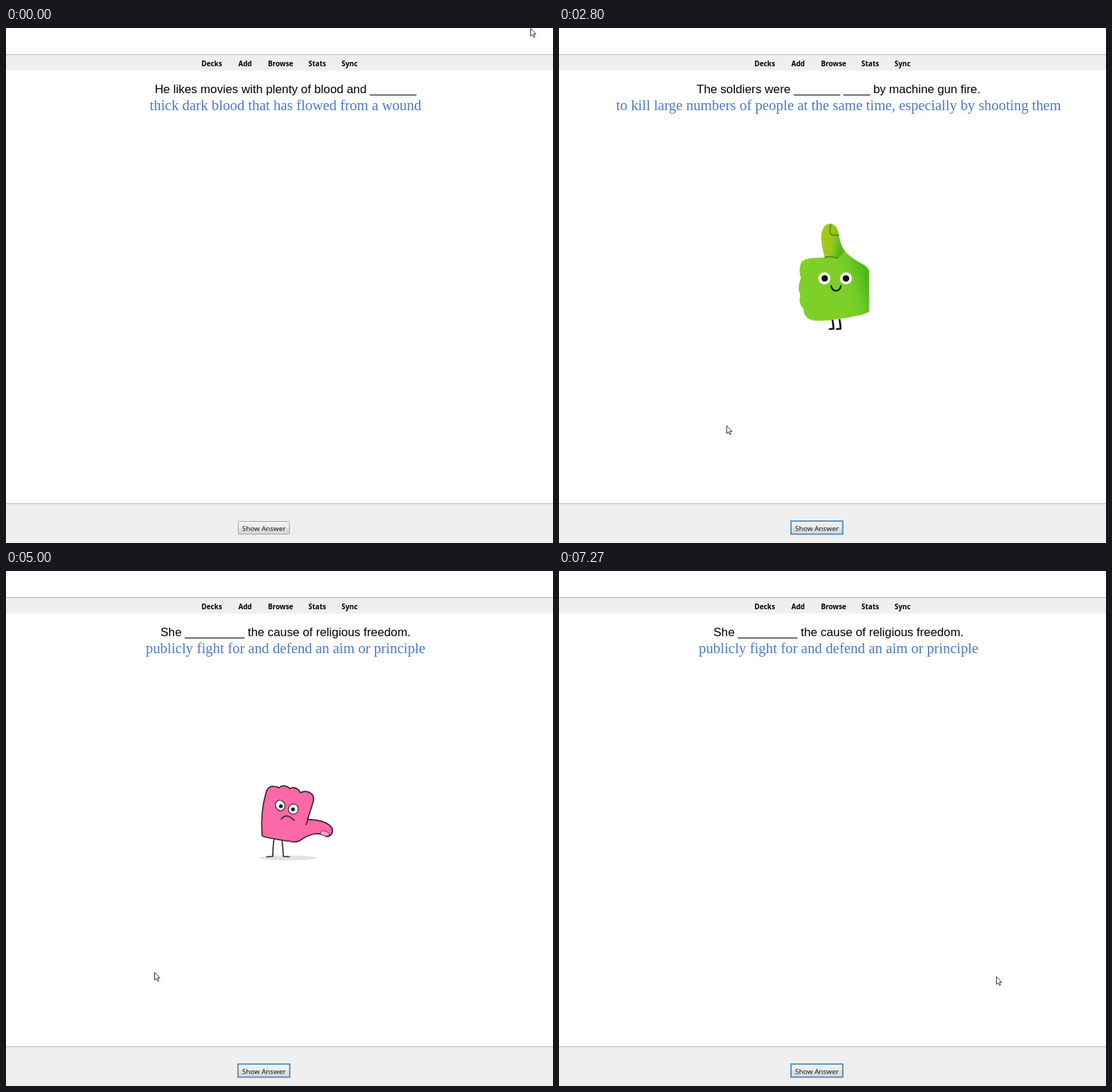
Recreate the animation shown at these times as an HTML page. Size 771 px wide and 727 px high, loop 7.33 s.

```html
<!DOCTYPE html>
<html lang="en">
<head>
<meta charset="utf-8">
<title>Flashcard review</title>
<style>
  html, body { margin: 0; width: 100%; height: 100%; overflow: hidden; background: #fff; }
  svg { display: block; }
  text { text-anchor: middle; white-space: pre; }
  .nav { font: 700 9.8px "Open Sans", sans-serif; }
  .ui { font: 9.8px "Open Sans", sans-serif; }
  .ask { font: 16.8px "Liberation Sans", sans-serif; }
  .hint { font: 20.4px "Liberation Serif", serif; fill: #4a7bc2; }
  .reply { font: 19.6px "Liberation Sans", sans-serif; fill: #980f76; }
  .line { fill: none; stroke-linecap: round; stroke-linejoin: round; }
  .ink { stroke: #35262c; stroke-width: 1.7; }
</style>
</head>
<body>
<svg width="771" height="727" viewBox="0 0 771 727">
  <defs>
    <linearGradient id="face" x2="0" y2="1">
      <stop offset="0" stop-color="#f2f2f2"/><stop offset=".5" stop-color="#ebebeb"/>
      <stop offset=".5" stop-color="#e0e0e0"/><stop offset="1" stop-color="#d6d6d6"/>
    </linearGradient>
    <linearGradient id="leaf" gradientUnits="userSpaceOnUse" x1="401" y1="374" x2="437" y2="364">
      <stop offset="0" stop-color="#7ed028"/><stop offset=".5" stop-color="#70cb25"/>
      <stop offset="1" stop-color="#4cb91b"/>
    </linearGradient>
    <linearGradient id="tip" gradientUnits="userSpaceOnUse" x1="371" y1="298" x2="399" y2="304">
      <stop offset="0" stop-color="#a4c81b"/><stop offset=".5" stop-color="#98c81d"/>
      <stop offset=".75" stop-color="#74c121"/><stop offset="1" stop-color="#4fb31c"/>
    </linearGradient>
  </defs>

  <rect width="771" height="727" fill="#fff"/>
  <path d="M0 37h771v23H0zM0 671h771v56H0z" fill="#efefef"/>
  <path d="M0 37.5h771M0 671.5h771" stroke="#b9b9b9"/>
  <g id="nav" class="nav"></g>

  <g id="card">
    <text id="ask" class="ask" x="394" y="92"/>
    <text id="hint" class="hint" x="394" y="116"/>
    <g id="back">
      <path d="M0 130.5h771" stroke="#a3a3a3"/>
      <text id="reply" class="reply" x="394" y="157.5"/>
    </g>
  </g>

  <g id="plain"></g>
  <g id="focused"></g>
  <g id="grades"></g>

  <g id="green">
    <path id="greenLegs" class="line" stroke="#111" stroke-width="2.6"/>
    <g id="greenBody">
      <path fill="url(#leaf)" d="M374 323L393 311L399 309Q407 321 424 330Q436 336 437 342V399Q434 403 406 408Q380 413 360 412Q345 410 344.500 395Q337 389 340 375Q335 367 341 352Q337 339 342 329Q347 323 374 323Z"/>
      <path fill="url(#tip)" d="M375 324Q370 309 369.500 293Q371 276 382 275Q392 276 394 289Q396 304 403 315L392 325Z"/>
      <path class="line" stroke="#45961b" stroke-width="1.800" d="M383 277Q380 290 385 291Q389 292 394 291M375 322.500Q384 321 393 323.500"/>
      <g fill="#fff"><circle cx="374" cy="352.500" r="8.500"/><circle cx="404.500" cy="352.500" r="8.500"/></g>
      <g fill="#111"><circle cx="374.500" cy="352.500" r="4.600"/><circle cx="404.500" cy="352.500" r="4.600"/></g>
      <path class="line" stroke="#111" stroke-width="2.200" d="M383.500 363Q385 370 390.500 370Q397 369 397 363"/>
    </g>
  </g>

  <g id="pink">
    <ellipse id="shade" cx="398" fill="#e2e2e2" rx="41"/>
    <path id="pinkLegs" class="line ink"/>
    <g id="pinkBody">
      <path class="ink" fill="#ff68a6" stroke-linejoin="round" d="M361 373C359 350 362 328 367 311Q371 303 377 304Q382 304 385 306Q391 300 400 307Q410 303 415 313Q423 309 430 314Q435 318 433 326L425 351C437 350 455 354 460 364Q461 374 452 375Q444 370 436 371Q428 372 418 378Q410 384 403 382Q385 380 363 375Q361 374 361 373Z"/>
      <path class="line ink" d="M426 350L423 358"/>
      <path fill="#ff9dc5" stroke="#7d3a58" d="M443 371Q444 366 449 367Q455 368 456 373Q450 376 443 371Z"/>
      <g fill="#fff" stroke="#35262c" stroke-width="1.200">
        <ellipse cx="386.500" cy="331" rx="6.600" ry="7.600" transform="rotate(-20 386.500 331)"/>
        <ellipse cx="405" cy="336" rx="7" ry="7.200"/>
      </g>
      <g fill="#222"><circle cx="387.500" cy="332" r="2.700"/><circle cx="404.500" cy="336.500" r="2.700"/></g>
      <path id="frown" class="line ink" d="M388 350Q396 341 406 352"/>
      <circle id="gasp" cx="390" cy="351" r="4.200" fill="#222"/>
    </g>
  </g>

  <path id="cursor" d="M.5.5V11.500L3 9.200L4.700 13L6.400 12.200L4.800 8.500H8Z" fill="#fff" stroke="#222" stroke-width=".9"/>
</svg>

<script>
const LOOP = 7330, STEP = 1000 / 15;
const $ = id => document.getElementById(id);

const cards = [
  ["He likes movies with plenty of blood and _______",
   "thick dark blood that has flowed from a wound", "gore"],
  ["The soldiers were _______ ____ by machine gun fire.",
   "to kill large numbers of people at the same time, especially by shooting them", "mown down"],
  ["She _________ the cause of religious freedom.",
   "publicly fight for and defend an aim or principle", ""]
];

const turns = [1270, 2400, 3330, 4530];      // start of each fade
const barTurns = [1270, 2330, 3330, 4470];   // bottom bar switches
const fade = [[-67, 1], [0, .65], [70, .1], [130, .35], [200, .8], [260, 1]];

// rows: time, x, y
const pointer = [
  [0, 739, 0], [270, 244, 565], [470, 244, 565], [1130, 236, 561],
  [4070, 236, 561], [4130, 230, 563], [4400, 209, 566], [6130, 209, 566],
  [6470, 628, 580], [6730, 628, 580], [6930, 616, 571], [7200, 616, 571], [7270, 616, 572]
];
// rows: time, turn of the fist (0 sideways, 1 down)
const swing = [
  [4330, 0], [4530, -.06], [4730, .04], [5000, 0], [5200, -.12],
  [5470, 1.08], [5600, .95], [5730, 1.04], [5870, 1]
];

const mix = (a, b, p) => a + (b - a) * p;
const passed = (list, t) => list.filter(s => t >= s).length;
const show = (id, on) => { $(id).style.display = on ? "" : "none"; };

function track(rows, t, col = 1) {
  const i = rows.findIndex(r => r[0] > t);
  if (i < 0) return rows[rows.length - 1][col];
  if (i === 0) return rows[0][col];
  const a = rows[i - 1], b = rows[i];
  return mix(a[col], b[col], (t - a[0]) / (b[0] - a[0]));
}

const label = (cx, y, s, color = "#111") =>
  `<text class="ui" x="${cx}" y="${y}" fill="${color}">${s}</text>`;

function button(x, y, w, s, color, focus) {
  const frame = focus
    ? `<rect x="${x}" y="${y}" width="${w + 1}" height="18.500" fill="url(#face)" stroke="#3f8ac4" stroke-width="1.700"/>`
    : `<rect x="${x + .5}" y="${y + .5}" width="${w}" height="18" rx="1" fill="url(#face)" stroke="#a5a5a5"/>`;
  return frame + label(x + w / 2 + .5, y + 13.7, s, color);
}

$("nav").innerHTML = [["Decks", 290], ["Add", 337], ["Browse", 387], ["Stats", 438.7], ["Sync", 484.3]]
  .map(([s, x]) => `<text x="${x}" y="53.500">${s}</text>`).join("");
$("plain").innerHTML = button(327, 696, 72, "Show Answer");
$("focused").innerHTML = button(327, 696, 72, "Show Answer", "#111", true);
$("grades").innerHTML =
  label(301, 689, "&lt;1m") + label(364, 689, "&lt;10m") + label(426, 689, "4d") +
  button(276, 697, 50, "Again", "#dd2222") +
  button(338, 697, 51, "Good", "#3f7a12", true) +
  button(401, 697, 50, "Easy", "#2424c0");

function drawCard(t) {
  const side = passed(turns.map(s => s + 130), t);
  const [ask, hint, reply] = cards[side >> 1];
  $("ask").textContent = ask;
  $("hint").textContent = hint;
  $("reply").textContent = reply;
  show("back", side % 2);
  $("card").setAttribute("opacity", Math.min(...turns.map(s => track(fade, t - s))));

  const bar = passed(barTurns, t);
  show("plain", bar === 0);
  show("focused", bar > 0 && bar % 2 === 0);
  show("grades", bar % 2);
}

function drawGreen(t) {
  const on = t >= 2130 && t < 3670;
  show("green", on);
  if (!on) return;
  const drop = 1.6 + 1.6 * Math.cos((t - 2400) / 580 * 2 * Math.PI);
  $("greenBody").setAttribute("transform", `translate(0 ${drop})`);
  const leg = x => `M${x} ${411 + drop}Q${x + 1} 418 ${x + 1.5} 424.500L${x - 4} 425`;
  $("greenLegs").setAttribute("d", leg(385.5) + leg(395.5));
}

function drawPink(t) {
  const on = t >= 4330 && t < 5930;
  show("pink", on);
  if (!on) return;
  const p = track(swing, t);
  const x = mix(360, 376, p), y = mix(373, 318.5, p);
  $("pinkBody").setAttribute("transform",
    `translate(${x} ${y}) rotate(${58 * p}) scale(${mix(1, .96, p)}) translate(-360 -373)`);
  // each leg: hip and bend for both poses, then ankle and toe
  const leg = (hx, hy, hx2, hy2, bx, by, bx2, by2, ankle, toe) =>
    `M${mix(hx, hx2, p)} ${mix(hy, hy2, p)}Q${mix(bx, bx2, p)} ${mix(by, by2, p)} ${ankle} 403L${toe} 403.500`;
  $("pinkLegs").setAttribute("d",
    leg(378, 376, 380, 335, 376, 390, 356, 360, 376, 367.5) +
    leg(389, 378, 386, 350, 390, 391, 375, 368, 391, 399.5));
  $("shade").setAttribute("cy", mix(405, 406.5, p));
  $("shade").setAttribute("ry", mix(3.5, 6, p));
  show("frown", p < .5);
  show("gasp", p >= .5);
}

const start = performance.now();
function draw(now) {
  const ms = Math.max(0, now - start) % LOOP;
  const t = Math.round(Math.floor((ms + 4) / STEP) * STEP / 10) * 10 % LOOP;
  drawCard(t);
  drawGreen(t);
  drawPink(t);
  $("cursor").setAttribute("transform", `translate(${track(pointer, t, 1)} ${track(pointer, t, 2)})`);
  requestAnimationFrame(draw);
}
draw(start);
</script>
</body>
</html>
```
